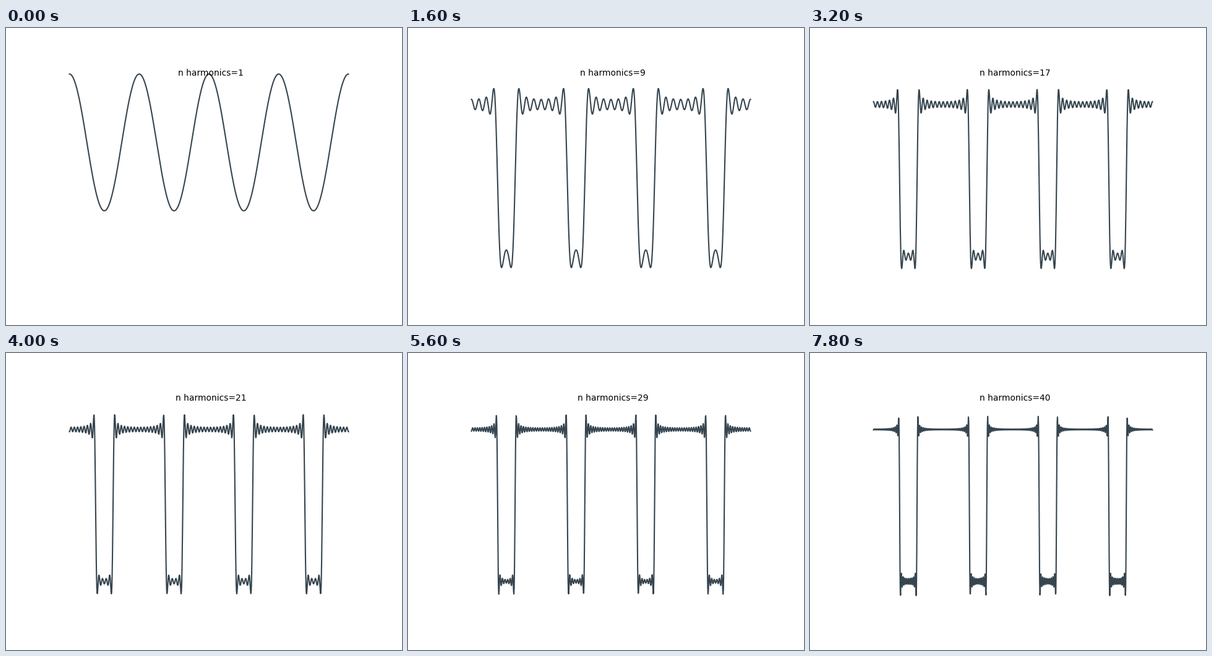
A matplotlib script for the animation above (8 s loop, 640 px wide and 480 px high).

```python
import numpy as np
import matplotlib.pyplot as plt
from matplotlib.animation import FuncAnimation

FRAMES = 40
PERIODS = 4
DUTY = 0.75
INK = "#36454f"

t = np.linspace(0, PERIODS, 1000)
k = np.arange(1, FRAMES + 1)[:, None]

# Partial Fourier sums of a pulse wave centred on t = 0
terms = 2 / (np.pi * k) * np.sin(np.pi * k * DUTY) * np.cos(2 * np.pi * k * t)
sums = DUTY + np.cumsum(terms, axis=0)


def padded(values, margin=0.05):
    low, high = values.min(), values.max()
    pad = margin * (high - low)
    return low - pad, high + pad


fig = plt.figure(figsize=(6.4, 4.8), dpi=100, facecolor="white")
ax = fig.add_axes([0.125, 0.11, 0.775, 0.77])
ax.axis("off")
ax.set_xlim(padded(t))
ax.set_ylim(padded(sums))

line, = ax.plot(t, sums[0], color=INK, lw=1.5)
label = ax.text(331 / 640, 403 / 480, "", transform=fig.transFigure,
                ha="center", va="baseline", fontsize=10,
                family="DejaVu Sans", color="black")


def update(i):
    line.set_ydata(sums[i])
    label.set_text(f"n harmonics={i + 1}")
    return line, label


anim = FuncAnimation(fig, update, frames=FRAMES, interval=200,
                     repeat=True, repeat_delay=0)
plt.show()
```
